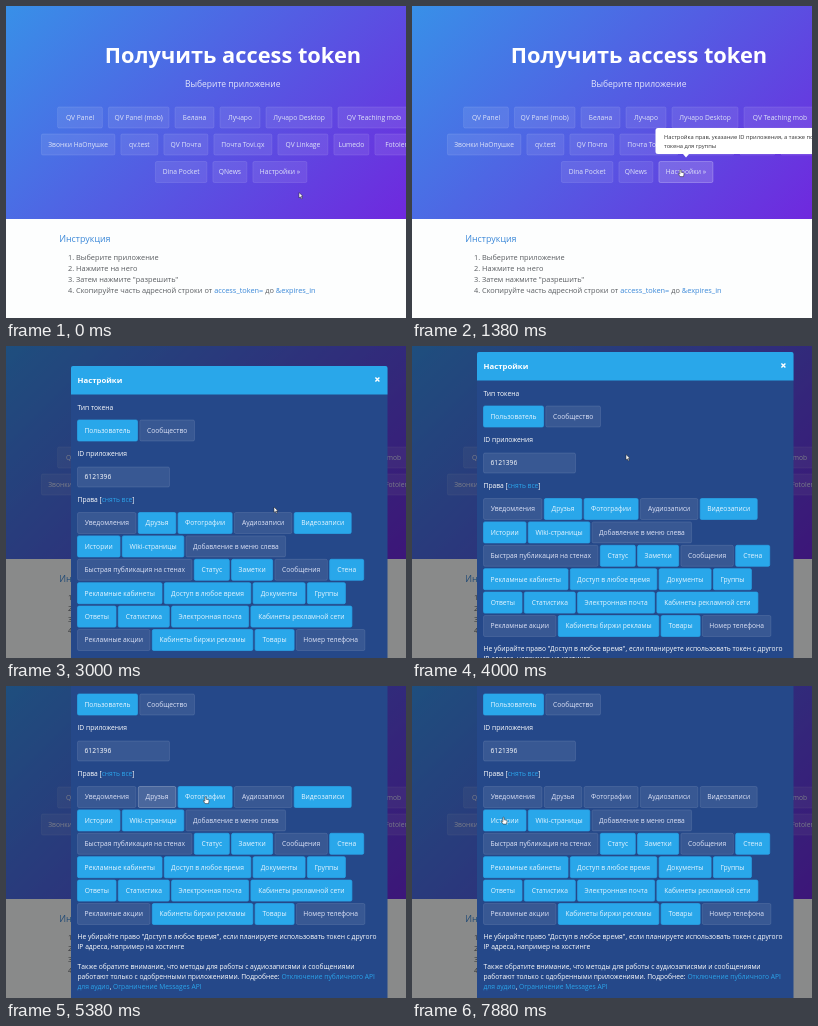
Write an HTML page that moves like this. It is 400 px wide and 312 px high and loops after 8 s.

```html
<!DOCTYPE html>
<html lang="ru">
<head>
<meta charset="utf-8">
<style>
html, body { margin: 0; width: 100%; height: 100%; overflow: hidden; background: #fff; }
svg { display: block; width: 400px; height: 312px; }
text { font: 6.7px "Open Sans", "Noto Sans", sans-serif; fill: #fff; white-space: pre; }
.mid { text-anchor: middle; }
.btn rect { fill: #fff; fill-opacity: .085; stroke: #fff; stroke-opacity: .14; stroke-width: .7; }
.btn text { text-anchor: middle; fill: #dfe4f8; }
.btn.on rect { fill: #29a7ea; fill-opacity: 1; stroke: #29a7ea; stroke-opacity: 1; }
.btn.on text { fill: #e6f5ff; }
.btn.focus:not(.on) rect { fill-opacity: .17; stroke-opacity: .35; }
#list text { font-size: 7.36px; fill: #5a5d61; }
#list .link { fill: #3b88d8; }
#modal .link { fill: #2ba3ea; }
#tip text { font-size: 5.75px; fill: #333; }
</style>
</head>
<body>
<svg viewBox="0 0 400 312">
  <defs>
    <linearGradient id="sky" gradientUnits="userSpaceOnUse" x1="60" y1="-60" x2="394" y2="273">
      <stop stop-color="#3890e8"/><stop offset="1" stop-color="#741fdd"/>
    </linearGradient>
  </defs>
  <rect width="400" height="312" fill="#fdfefe"/>
  <rect width="400" height="213" fill="url(#sky)"/>
  <text class="mid" x="227" y="56.8" style="font-size:21.8px;font-weight:700">Получить access token</text>
  <text class="mid" x="226.7" y="81" style="font-size:8.5px" fill-opacity=".85">Выберите приложение</text>
  <g id="apps"></g>
  <g id="list"></g>
  <g id="tip">
    <path d="M246 122H410V148H277L274 151.5L271 148H246Q243.5 148 243.5 145.5V124.5Q243.5 122 246 122Z" fill="#fff"/>
    <text x="252" y="133">Настройка прав, указание ID приложения, а также получение</text>
    <text x="252" y="142">токена для группы</text>
  </g>
  <rect id="shade" width="400" height="312"/>
  <g id="modal"></g>
  <path id="arrow" d="M0 0V5.4L1.3 4.3L2.2 6.3L3.2 5.9L2.3 3.9H4Z" fill="#fff" stroke="#222" stroke-width=".5"/>
  <path id="hand" d="M-.6 0Q0-.6.6 0V2.2L3 2.8Q3.7 3.1 3.5 4L3 6.6H-.4L-2.2 4Q-2.1 3.2-1.4 3.6L-.6 4.2Z" fill="#fff" stroke="#222" stroke-width=".5"/>
</svg>
<script>
const $ = id => document.getElementById(id);
const text = (x, y, s) => `<text x="${x}" y="${y}">${s}</text>`;
const link = s => `<tspan class="link">${s}</tspan>`;
const button = (x, y, w, label, cls = '', id = '') =>
  `<g class="btn ${cls}" id="${id}"><rect x="${x}" y="${y}" width="${w}" height="21" rx="1.5"/>` +
  text(x + w / 2, y + 12.9, label) + '</g>';

// Lays out [label, width, class, id] items from left to right.
const row = (x, y, gap, items) => items.map(([label, w, cls, id]) => {
  const html = button(x, y, w, label, cls, id);
  x += w + gap;
  return html;
}).join('');

$('apps').innerHTML =
  row(51.6, 101, 6, [['QV Panel', 44.8], ['QV Panel (mob)', 60.6], ['Белана', 39], ['Лучаро', 40],
    ['Лучаро Desktop', 66], ['QV Teaching mob', 72]]) +
  row(35.4, 128, 6, [['Звонки НаОпушке', 73.5], ['qv.test', 37], ['QV Почта', 44], ['Почта Tovi.qx', 58],
    ['QV Linkage', 50], ['Lumedo', 35], ['Fotolenta', 50]]) +
  row(149.4, 155.5, 6, [['Dina Pocket', 51.5], ['QNews', 34], ['Настройки »', 54, '', 'settings']]);

const steps = ['Выберите приложение', 'Нажмите на него', 'Затем нажмите "разрешить"',
  `Скопируйте часть адресной строки от ${link('access_token=')} до ${link('&amp;expires_in')}`];
$('list').innerHTML = `<text x="53.2" y="236" class="link" style="font-size:8.9px">Инструкция</text>` +
  steps.map((s, i) => text(62, 254 + i * 11, i + 1 + '.') + text(70, 254 + i * 11, s)).join('');

const rights = [
  [['Уведомления', 58.5], ['Друзья', 37.5, 'on', 'friends'], ['Фотографии', 54, 'on', 'photos'],
    ['Аудиозаписи', 57.5], ['Видеозаписи', 57, 'on', 'videos']],
  [['Истории', 42.5, 'on'], ['Wiki-страницы', 61.5, 'on'], ['Добавление в меню слева', 99.5]],
  [['Быстрая публикация на стенах', 114.5], ['Статус', 35, 'on'], ['Заметки', 41, 'on'],
    ['Сообщения', 52.5], ['Стена', 34, 'on']],
  [['Рекламные кабинеты', 84.5, 'on'], ['Доступ в любое время', 86.5, 'on'], ['Документы', 52, 'on'], ['Группы', 38, 'on']],
  [['Ответы', 38.5, 'on'], ['Статистика', 51, 'on'], ['Электронная почта', 77, 'on'], ['Кабинеты рекламной сети', 101, 'on']],
  [['Рекламные акции', 72.5], ['Кабинеты биржи рекламы', 100.5, 'on'], ['Товары', 39, 'on'], ['Номер телефона', 68.5]]
];
const notes = [
  [319, 'Не убирайте право "Доступ в любое время", если планируете использовать токен с другого'],
  [328.5, 'IP адреса, например на хостинге'],
  [349, 'Также обратите внимание, что методы для работы с аудиозаписями и сообщениями'],
  [359, `работают только с одобренными приложениями. Подробнее: ${link('Отключение публичного API')}`],
  [369, `${link('для аудио')}, ${link('Ограничение Messages API')}`]
];
$('modal').innerHTML =
  '<rect x="65" y="20" width="316.5" height="385" rx="2" fill="#254889"/>' +
  '<path d="M65 48.5V22Q65 20 67 20H379.5Q381.5 20 381.5 22V48.5Z" fill="#29a7ea"/>' +
  '<text x="71.5" y="37" style="font-size:7.8px;font-weight:700">Настройки</text>' +
  '<path d="M369.4 31.6L373.4 35.6M373.4 31.6L369.4 35.6" stroke="#fff" stroke-width="1.4"/>' +
  text(71.5, 63.5, 'Тип токена') +
  row(71.5, 74, 2.3, [['Пользователь', 60, 'on'], ['Сообщество', 54.7]]) +
  text(71.5, 110, 'ID приложения') +
  '<g class="btn"><rect x="71.5" y="121" width="92" height="20" rx="1.5"/></g>' +
  text(78.5, 133.4, '6121396') +
  text(71.5, 156, `Права [${link('снять все')}]`) +
  rights.map((items, i) => row(71.5, 166.5 + i * 23.4, 2.3, items)).join('') +
  notes.map(([y, s]) => text(71.5, y, s)).join('') +
  button(329, 379, 46, 'Сохранить');

const span = (t, a, b) => Math.min(1, Math.max(0, (t - a) / (b - a)));
const smooth = p => p * p * (3 - 2 * p);
const within = (t, a, b) => t >= a && t < b;

// Pointer stops: time, x, y
const path = [[250, 293, 186.5], [900, 268.5, 164], [1900, 268.5, 164], [2125, 268, 161], [3375, 268, 161],
  [3900, 214, 108.5], [4375, 214, 108.5], [4750, 150, 110], [5125, 150, 110], [5375, 199.5, 111],
  [5750, 199.5, 111], [6125, 316, 111], [6750, 316, 111], [7500, 91.5, 131.5], [8000, 91.5, 131.5]];

function pointer(t) {
  const i = path.findIndex(p => p[0] > t);
  if (i === 0) return path[0].slice(1);
  const [t0, x0, y0] = path[i - 1], [t1, x1, y1] = path[i];
  const p = smooth(span(t, t0, t1));
  return [x0 + (x1 - x0) * p, y0 + (y1 - y0) * p];
}

function draw(t) {
  $('tip').setAttribute('opacity', span(t, 600, 875) * (1 - span(t, 1950, 2125)));
  $('shade').setAttribute('opacity', .46 * span(t, 2050, 2225));

  const open = span(t, 2247, 2547), eased = 1 - (1 - open) ** 2;
  const scroll = 14 * smooth(span(t, 3750, 4000)) + 52 * smooth(span(t, 4000, 4375));
  $('modal').setAttribute('opacity', eased);
  $('modal').setAttribute('transform', `translate(0 ${-95 * (1 - eased) - scroll})`);

  const toggle = (id, off, leave) => {
    $(id).classList.toggle('on', t < off);
    $(id).classList.toggle('focus', within(t, off, leave));
  };
  toggle('friends', 5000, 5625);
  toggle('photos', 5625, 6375);
  toggle('videos', 6375, 7250);
  $('settings').classList.toggle('focus', t >= 500);

  const [x, y] = pointer(t);
  const hand = within(t, 500, 2125) || within(t, 4625, 6875) || t >= 7375;
  for (const [id, shown] of [['arrow', !hand], ['hand', hand]]) {
    $(id).setAttribute('transform', `translate(${x} ${y})`);
    $(id).setAttribute('visibility', shown ? 'visible' : 'hidden');
  }
}

const start = performance.now();
function tick() {
  const t = (performance.now() - start) % 8000;
  draw(Math.floor(t / 125) * 125);
  requestAnimationFrame(tick);
}
tick();
</script>
</body>
</html>
```
